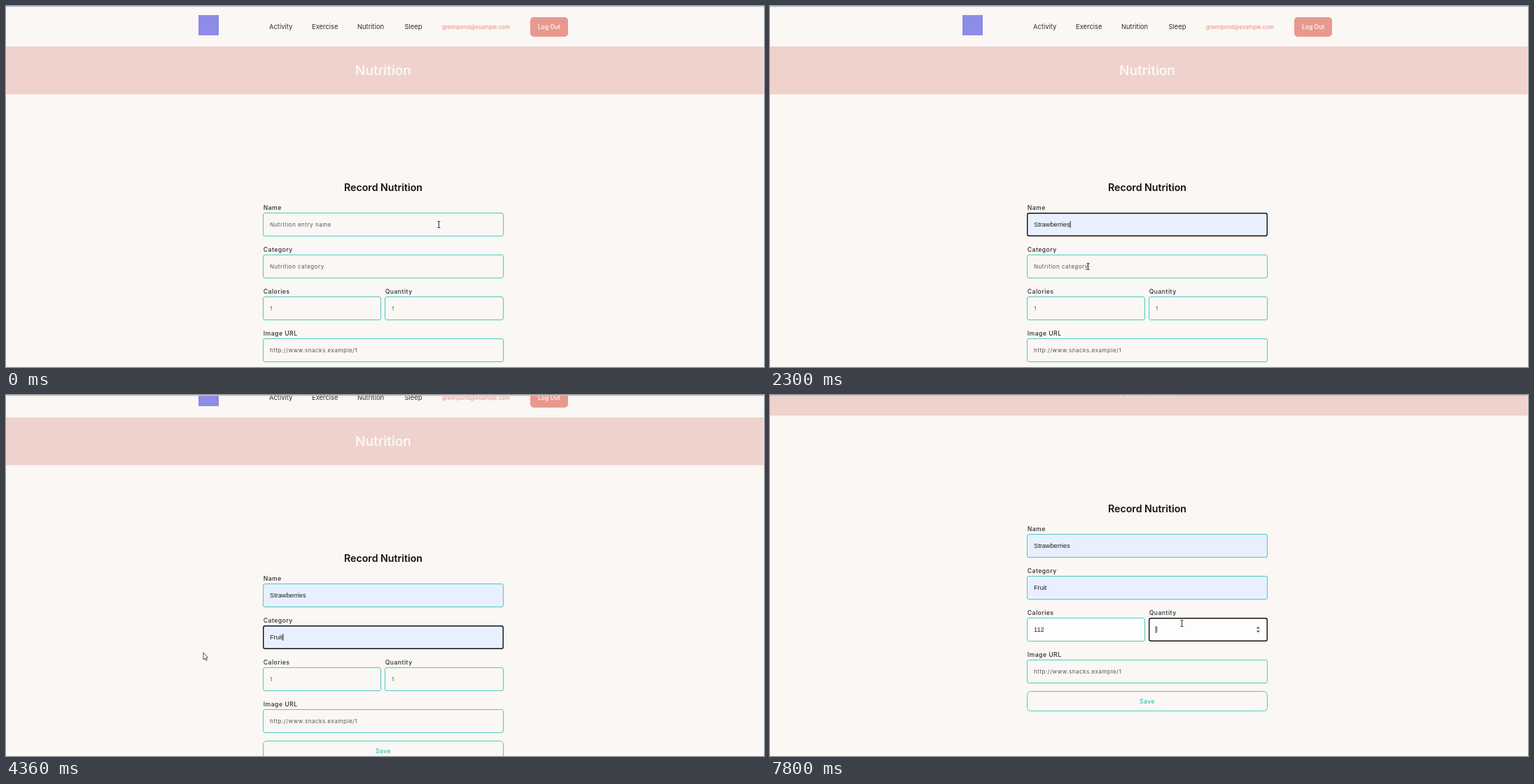
An HTML page with a canvas that plays this animation: 1083 px wide and 517 px high, repeating every 8 s.

```html
<!DOCTYPE html>
<html lang="en">
<head>
<meta charset="utf-8">
<title>Record Nutrition</title>
<style>
  html, body { margin: 0; width: 100%; height: 100%; overflow: hidden; background: #fbf7f4; }
  canvas { display: block; width: 1083px; height: 517px; }
</style>
</head>
<body>
<canvas id="stage" width="1083" height="517"></canvas>
<script>
const ctx = document.getElementById('stage').getContext('2d');
const LOOP = 8000;
const PAGE = '#fbf7f4', PINK = '#efd2cc', CORAL = '#e8998d', TEAL = '#50cabd';
const INK = '#2d2d2d', FILLED = '#e8f0fe', ACTIVE = '#fefdfc', MENU = '#292a2d';
const SANS = 'Inter, sans-serif', ARIAL = '"Liberation Sans", Arial, sans-serif';
const MENU_FONT = '"Open Sans", sans-serif';

const FOODS = ['Grapes', 'Strawberries', 'Kiwi', 'Eggs', 'Herbal Planting Compendium', 'Not Started'];
const KINDS = ['Fruit', 'Protein'];

// [time, x, y, shape]; the pointer jumps between these places
const POINTER = [
  [0, 618, 313, 'beam'], [120, 592, 313, 'beam'], [250, 530, 314, 'beam'],
  [390, 478, 315, 'beam'], [520, 455, 315, 'beam'], [1230, 454, 325, 'beam'],
  [1370, 454, 338, 'arrow'], [1500, 454, 348, 'arrow'], [1630, 454, 357, 'arrow'],
  [1760, 454, 364, 'arrow'], [1900, 454, 368, 'arrow'], [2180, 454, 373, 'beam'],
  [2700, 455, 375, 'beam'], [3260, 459, 403, 'arrow'], [3380, 456, 405, 'arrow'],
  [3680, 453, 406, 'arrow'], [4110, 350, 385, 'arrow'], [4240, 282, 369, 'arrow'],
  [4660, 330, 352, 'arrow'], [4930, 389, 333, 'beam'], [7230, 430, 331, 'beam'],
  [7380, 520, 329, 'beam'], [7520, 588, 327, 'beam']
];
const SCROLL = [[0, 0], [4360, 26], [4510, 97]];
const FOCUS = [[0, ''], [520, 'name'], [2700, 'category'], [5080, 'calories'], [7660, 'quantity']];
const CALORIES = [[0, ''], [6110, '1'], [6390, '11'], [6670, '112']];

const at = (track, t) => track.reduce((found, key) => key[0] <= t ? key : found);
const during = (t, from, to) => t >= from && t < to;

function box(x, y, w, h, r, fill) {
  ctx.beginPath();
  ctx.roundRect(x, y, w, h, r);
  ctx.fillStyle = fill;
  ctx.fill();
}

// the border lies inside the given box
function frame(x, y, w, h, r, color, line = 1) {
  ctx.beginPath();
  ctx.roundRect(x + line / 2, y + line / 2, w - line, h - line, r);
  ctx.strokeStyle = color;
  ctx.lineWidth = line;
  ctx.stroke();
}

function shape(points, fill, stroke) {
  ctx.beginPath();
  points.forEach(([x, y]) => ctx.lineTo(x, y));
  ctx.closePath();
  ctx.fillStyle = fill;
  ctx.fill();
  if (stroke) { ctx.strokeStyle = stroke; ctx.lineWidth = 0.8; ctx.stroke(); }
}

// y is the middle of the capitals
function label(str, x, y, size, color, { weight = 400, family = SANS, gap = 0, align = 'left' } = {}) {
  ctx.font = `${weight} ${size}px ${family}`;
  ctx.letterSpacing = gap + 'px';
  ctx.textAlign = align;
  ctx.fillStyle = color;
  ctx.fillText(str, x, y + size * 0.36);
  return ctx.measureText(str).width;
}

function header() {
  box(275, 13, 29, 29, 0, '#8d8ce6');
  [['Activity', 376], ['Exercise', 437], ['Nutrition', 502], ['Sleep', 569.5]]
    .forEach(([str, x]) => label(str, x, 30, 9.4, INK));
  label('greenpond@example.com', 623, 30, 7.7, CORAL, { weight: 500 });
  box(749, 16, 54, 28, 5, CORAL);
  label('Log Out', 776, 30, 8.5, '#fff', { weight: 500, align: 'center' });
  box(0, 58, 1082.5, 68.5, 0, PINK);
  label('Nutrition', 539, 92, 18.9, PAGE, { weight: 600, align: 'center' });
}

function field({ title, x = 367, y, w = 344, hint, value = '', preview, focused, caret, spinner }) {
  label(title, x + 0.7, y - 7, 8.6, INK, { weight: 500, gap: 0.5 });
  if (spinner && (value || focused)) box(x, y, w, 34, 3, ACTIVE);
  else if (value || preview) box(x, y, w, 34, 3, FILLED);
  if (focused) frame(x, y, w, 34, 2.5, '#111', 1.4);
  else frame(x, y, w, 34, 2.5, TEAL);

  const left = x + 10, mid = y + 17;
  let end = 0;
  if (preview) label(preview, left, mid, 7.7, '#111', { family: ARIAL });
  else if (value) end = label(value, left, mid, 9.2, '#1c1c24', { family: ARIAL });
  else label(hint, left, mid, 8, '#555', { gap: 0.52 });
  if (caret) box(left + end, mid - 5, 1, 10, 0, '#222');
  if (spinner && focused) {
    const sx = x + w - 13.5;
    shape([[sx - 2.5, mid - 1.5], [sx, mid - 4.2], [sx + 2.5, mid - 1.5]], '#505050');
    shape([[sx - 2.5, mid + 1.5], [sx, mid + 4.2], [sx + 2.5, mid + 1.5]], '#505050');
  }
}

function menu(items, y, w, active) {
  const row = 20.5;
  ctx.shadowColor = 'rgba(0,0,0,.25)';
  ctx.shadowBlur = 3;
  box(424, y, w, items.length * row + 4.8, 2, MENU);
  ctx.shadowBlur = 0;
  shape([[431, y + 0.5], [436.5, y - 5], [442, y + 0.5]], MENU);
  items.forEach((item, i) => {
    if (i === active) box(424, y + 2.7 + i * row, w, row, 0, '#434447');
    label(item, 431, y + 13 + i * row, 6.9, '#f3f3f3', { family: MENU_FONT });
  });
}

function form(t) {
  const focus = at(FOCUS, t)[1];
  const hover = t >= 1630 ? 1 : t >= 1370 ? 0 : -1;
  const kindHover = t >= 3380 ? 0 : -1;
  const foodsOpen = during(t, 650, 2180), kindsOpen = during(t, 2700, 3960);

  label('Record Nutrition', 539, 260, 14.2, '#111', { weight: 600, align: 'center' });
  field({
    title: 'Name', y: 296, hint: 'Nutrition entry name', focused: focus === 'name',
    value: t >= 2180 ? FOODS[1] : '', preview: foodsOpen && FOODS[hover],
    caret: during(t, 520, 1100) || during(t, 1630, 2180) || during(t, 2300, 2700)
  });
  field({
    title: 'Category', y: 356, hint: 'Nutrition category', focused: focus === 'category',
    value: t >= 3960 ? KINDS[0] : '', preview: kindsOpen && KINDS[kindHover],
    caret: during(t, 2700, 3260) || during(t, 3960, 4510)
  });
  field({
    title: 'Calories', y: 416, w: 169, hint: '1', spinner: true, focused: focus === 'calories',
    value: at(CALORIES, t)[1], caret: during(t, 5080, 5640) || during(t, 6110, 7230)
  });
  field({
    title: 'Quantity', x: 541, y: 416, w: 170, hint: '1', spinner: true,
    focused: focus === 'quantity', caret: t >= 7660
  });
  field({ title: 'Image URL', y: 476, hint: 'http://www.snacks.example/1' });
  frame(367, 521, 344, 29, 5, TEAL);
  label('Save', 539, 535.7, 8.6, '#35bfb0', { weight: 500, gap: 0.5, align: 'center' });

  if (foodsOpen) menu(FOODS, 336, 110, hover);
  if (kindsOpen) menu(KINDS, 396, 48, kindHover);
}

function pointer(t) {
  const [, x, y, kind] = at(POINTER, t);
  if (kind === 'beam') {
    box(x, y - 4.5, 1, 9, 0, '#333');
    box(x - 1.5, y - 5, 4, 1, 0, '#444');
    box(x - 1.5, y + 4, 4, 1, 0, '#444');
    return;
  }
  const outline = [[0, 0], [0, 10], [2.2, 8], [3.7, 11.2], [5.2, 10.5], [3.8, 7.4], [6.6, 7.2]];
  shape(outline.map(([dx, dy]) => [x + dx, y + dy]), '#fff', '#222');
}

function draw(now) {
  const t = now % LOOP;
  ctx.fillStyle = PAGE;
  ctx.fillRect(0, 0, 1083, 517);
  ctx.save();
  ctx.translate(0, -at(SCROLL, t)[1]);
  header();
  form(t);
  ctx.restore();
  box(0, 0, 1083, 1.3, 0, '#b4c3e0');
  pointer(t);
}

const start = performance.now();
function tick() {
  draw(performance.now() - start);
  requestAnimationFrame(tick);
}
tick();
</script>
</body>
</html>
```
